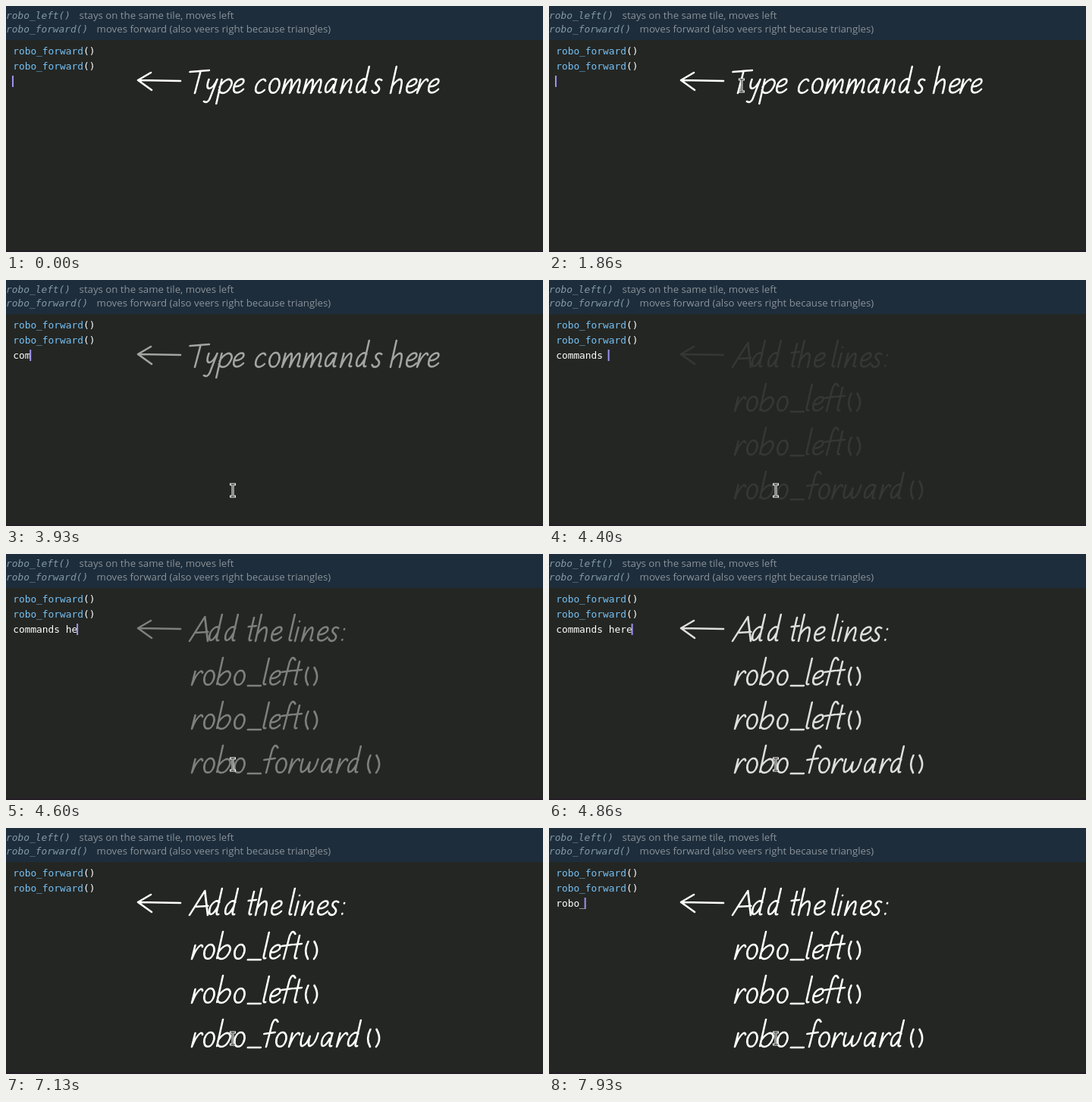
An HTML page that plays this animation: 708 px wide and 325 px high, repeating every 8000 ms.

```html
<!DOCTYPE html>
<html lang="en">
<head>
<meta charset="utf-8">
<title>Type commands here</title>
<style>
  html, body { margin: 0; width: 100%; height: 100%; overflow: hidden; background: #242623; }
  svg { display: block; width: 708px; height: 325px; }
  .code { font: 12.85px "DejaVu Sans Mono", monospace; fill: #fff; white-space: pre; }
  .call { fill: #76c2f6; }
  .doc { font-style: italic; fill: #8399a6; }
  .note { font: 13.23px "Open Sans", sans-serif; fill: #8b9299; }
  .ink { fill: none; stroke: #fff; stroke-width: 2.6; stroke-linecap: round; stroke-linejoin: round; }
  .beam { fill: none; stroke-linecap: square; }
</style>
</head>
<body>
<svg viewBox="0 0 708 325">
  <defs><path id="beam" d="M-2.5-8H2.5M0-8V8M-2.5 8H2.5"/></defs>
  <rect width="708" height="325" fill="#242623"/>
  <rect width="708" height="45" fill="#1d2d3b"/>
  <rect y="323" width="708" height="2" fill="#241d27"/>
  <text class="code doc" x="0" y="17">robo_left()</text>
  <text class="note" x="96.6" y="17">stays on the same tile, moves left</text>
  <text class="code doc" x="0" y="35">robo_forward()</text>
  <text class="note" x="119.6" y="35">moves forward (also veers right because triangles)</text>
  <text class="code" x="9.2" y="64"><tspan class="call">robo_forward</tspan>()</text>
  <text class="code" x="9.2" y="84"><tspan class="call">robo_forward</tspan>()</text>
  <text class="code" id="typed" x="9.2" y="104"></text>
  <rect id="caret" y="92" width="2" height="15" fill="#9c92f0"/>
  <g id="first" class="ink"></g>
  <g id="second" class="ink"></g>
  <g id="pointer" class="beam">
    <use href="#beam" stroke="#fff" stroke-width="3"/>
    <use href="#beam" stroke="#222" stroke-width="1"/>
  </g>
</svg>
<script>
const LOOP = 8000;
const $ = id => document.getElementById(id);

// Pen strokes, upright, baseline at 0: [advance, path]
const bowl = "M11-17C7-21 0-16 0-7C0 2 6 1 10-11";
const belly = "M0-8C4-17 10-20 13-17C18-13 13 0 6 0Q2 0 0-4";
const glyphs = {
  A: [25, "M0 0L14-32L24 0M5-11L22-12"],
  T: [21, "M-5-28L20-30M9-29L7 0"],
  a: [21, bowl + "M12-18L11-4Q11 0 14-1"],
  b: [21, "M1-36L0-1" + belly],
  c: [17, "M11-16C8-22 0-15 0-7C0 1 7 2 12-4"],
  d: [21, bowl + "M11-35L10-4Q10 0 13-1"],
  e: [15, "M1-9C6-8 13-12 11-17C9-21 0-17 0-8C0 2 8 1 13-5"],
  f: [15, "M13-33Q8-40 6-30L4 0M-2-17L12-19"],
  h: [20, "M1-35L0 0M0-8C4-17 9-20 11-17Q13-14 12 0"],
  i: [9, "M1-18L0 0M1-26v.1"],
  l: [8, "M1-35L0-4Q0 0 3-1"],
  m: [28, "M1-18L0 0Q3-14 8-18Q11-19 10 0Q14-15 18-18Q22-19 20-3Q20 0 23-1"],
  n: [20, "M1-18L0 0Q4-15 9-18Q13-19 11-3Q11 0 14-1"],
  o: [19, "M7-19A6.4 9.4 0 1 0 7.1-19Z"],
  p: [19, "M1-18L0 14" + belly],
  r: [14, "M1-18L0 0Q3-15 8-18Q10-19 11-16"],
  s: [18, "M10-17C6-20 2-17 3-13C4-10 10-9 9-4C8 1 2 1 0-3"],
  t: [12, "M4-31L3-4Q3 0 6-1M-1-19L9-20"],
  w: [28, "M1-18Q-1 0 4-1Q9-3 11-14Q10 0 14-1Q20-3 21-18"],
  y: [17, "M1-18Q-1-6 4-6Q9-7 12-18L7 8Q5 14 0 11"],
  _: [21, "M1 1H18"],
  "(": [16, "M5-23Q1-10 9 0"],
  ")": [11, "M-3-23Q7-10 1 0"],
  ":": [8, "M0-16v.6M0-2v.6"]
};

function word(text, x, y) {
  let out = "";
  for (const ch of text) {
    const [advance, path] = glyphs[ch];
    out += `<path transform="translate(${x} ${y}) skewX(-11)" d="${path}"/>`;
    x += advance;
  }
  return out;
}

const arrow = '<path d="M230 99L174 98M191 88L174 98L192 111"/>';
$("first").innerHTML = arrow +
  word("Type", 242, 115) + word("commands", 328, 115) + word("here", 507, 115);
$("second").innerHTML = arrow +
  word("Add", 242, 115) + word("the", 317, 115) + word("lines:", 373, 115) +
  word("robo_left()", 245, 173) + word("robo_left()", 245, 231) + word("robo_forward()", 245, 289);

// Contents of the typed line: [time, text]
const edits = [[0, ""]];
function type(start, step, text) {
  const before = edits[edits.length - 1][1];
  [...text].forEach((_, i) => edits.push([start + i * step, before + text.slice(0, i + 1)]));
}
type(3750, 76, "commands ");
type(4490, 90, "here");
type(5500, 100, " lol");
edits.push([6400, "commands here "], [6480, "commands "], [6560, ""]);
type(7380, 115, "robo_");

// Pointer stops: [time, x, y]
const stops = [
  [1400, 180, 340], [1600, 198, 215], [1730, 212, 135], [1860, 253, 105],
  [2060, 430, 104], [2230, 662, 125], [2400, 480, 220], [2600, 299, 278]
];

const clamp = v => Math.max(0, Math.min(1, v));

function pointerAt(t) {
  if (t <= stops[0][0]) return stops[0].slice(1);
  const next = stops.findIndex(s => s[0] > t);
  if (next < 0) return stops[stops.length - 1].slice(1);
  const [t0, x0, y0] = stops[next - 1], [t1, x1, y1] = stops[next];
  const k = (t - t0) / (t1 - t0);
  return [x0 + (x1 - x0) * k, y0 + (y1 - y0) * k];
}

function draw(t) {
  const [since, text] = edits.filter(e => e[0] <= t).pop();
  $("typed").textContent = text;
  $("caret").setAttribute("x", 8 + text.length * 7.736);
  const phase = since ? t - since : t + 300;
  $("caret").style.opacity = phase % 1000 < 500 ? 1 : 0;
  $("first").style.opacity = 1 - clamp((t - 3680) / 600);
  $("second").style.opacity = clamp((t - 4350) / 600);
  $("pointer").setAttribute("transform", `translate(${pointerAt(t)})`);
}

const start = performance.now();
function tick() {
  draw((performance.now() - start) % LOOP);
  requestAnimationFrame(tick);
}
tick();
</script>
</body>
</html>
```
